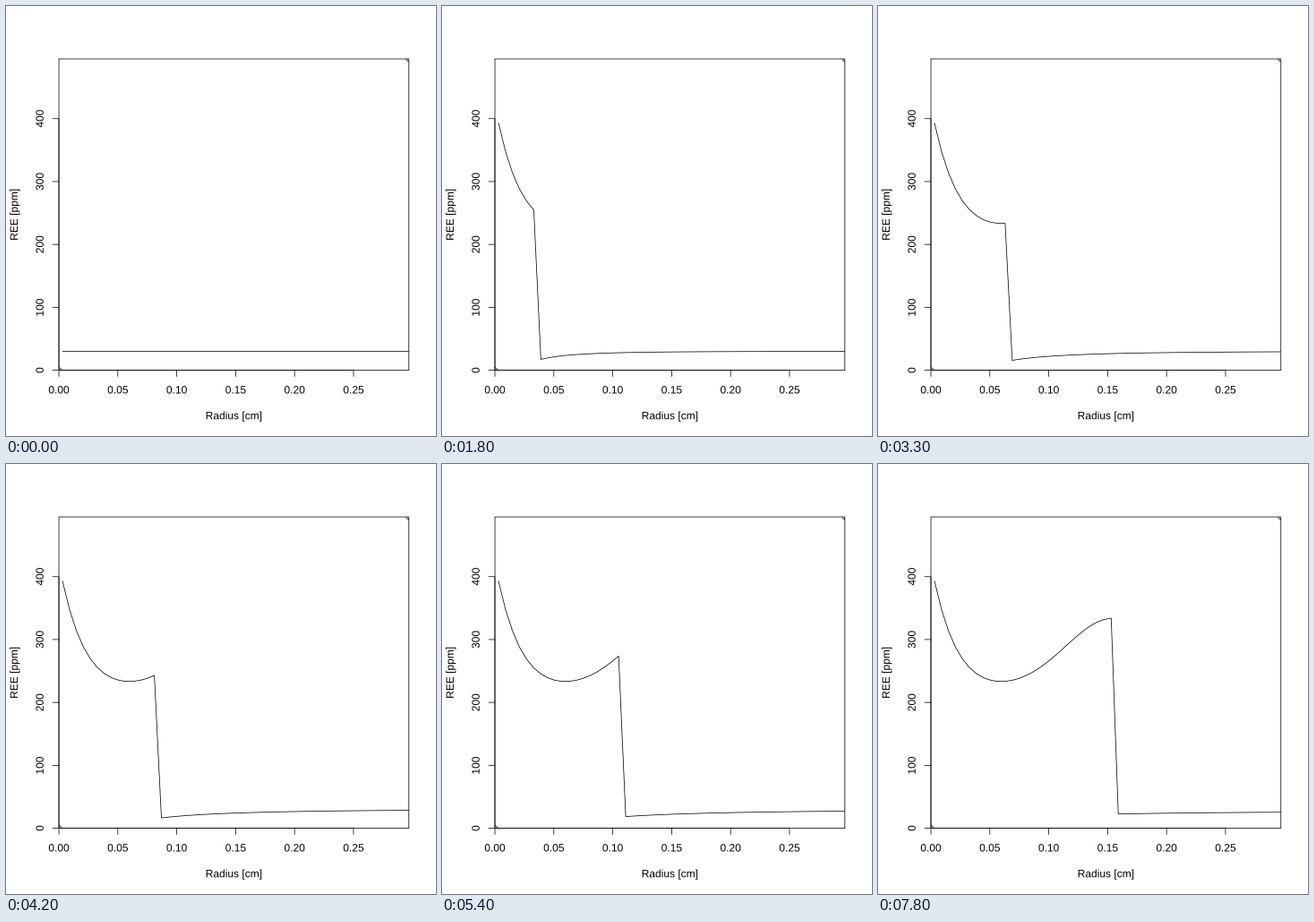
Recreate the animation shown at these times as a matplotlib script. Size 480x480 px, loop 8000 ms.

```python
import matplotlib.pyplot as plt
import numpy as np
from matplotlib.animation import FuncAnimation
from matplotlib.patches import Circle, PathPatch, Rectangle
from matplotlib.textpath import TextPath
from matplotlib.transforms import Affine2D

plt.rcParams["font.family"] = "Liberation Sans"

SIZE = 480
FONT_SIZE = 12
LEFT, RIGHT, TOP, BOTTOM = 59.04, 449.76, 59.04, 406.56
TICK = 7.2
R_MAX, C_MAX = 0.297, 495
BULK = 30           # initial concentration of the surroundings
PARTITION = 14.8    # crystal / surroundings ratio at the rim
LINE = dict(color="black", lw=0.75, snap=False)

SHELLS = np.arange(50)
RADII = 0.003 + 0.006 * SHELLS

# smooth zoning of the crystal through a few key shells
ZONING = np.polynomial.Polynomial.fit(
    [0, 1, 4, 8, 13, 18, 22, 25],
    [393.5, 348, 268.5, 235.2, 242.9, 283.7, 321.3, 334], 7)


def px(r):
    return LEFT + (RIGHT - LEFT) * r / R_MAX


def py(c):
    return BOTTOM - (BOTTOM - TOP) * c / C_MAX


def profile(grown):
    """Concentration along the radius once `grown` shells have formed."""
    conc = np.full(RADII.size, float(BULK))
    if grown:
        conc[:grown] = ZONING(SHELLS[:grown])
        rim, outer = RADII[grown], RADII[grown:]
        decay = 25.4 * np.exp(-grown / 16) - 6
        depletion = BULK - conc[grown - 1] / PARTITION
        conc[grown:] -= depletion * rim / outer * np.exp(-decay * (outer - rim))
    return conc


fig = plt.figure(figsize=(SIZE / 72, SIZE / 72), dpi=72, facecolor="white")
ax = fig.add_axes([0, 0, 1, 1])
ax.set(xlim=(0, SIZE), ylim=(SIZE, 0))
ax.axis("off")


def stroke(xs, ys):
    return ax.plot(xs, ys, solid_capstyle="butt", solid_joinstyle="round",
                   **LINE)[0]


def label(x, y, text, rotation=0):
    """Outlined text, centred on x, y along its baseline."""
    path = TextPath((0, 0), text, size=FONT_SIZE)
    box = path.get_extents()
    place = (Affine2D().translate(-(box.x0 + box.x1) / 2, 0)
             .scale(1, -1).rotate_deg(-rotation).translate(x, y))
    ax.add_patch(PathPatch(place.transform_path(path), fc="black", lw=0,
                           snap=False))


ax.add_patch(Rectangle((LEFT, TOP), RIGHT - LEFT, BOTTOM - TOP,
                       fill=False, **LINE))

# axes
stroke([LEFT, px(0.25)], [BOTTOM, BOTTOM])
for r in np.arange(6) * 0.05:
    stroke([px(r), px(r)], [BOTTOM, BOTTOM + TICK])
    label(px(r), 432.48, f"{r:.2f}")

stroke([LEFT, LEFT], [BOTTOM, py(400)])
for c in range(0, 500, 100):
    stroke([LEFT - TICK, LEFT], [py(c), py(c)])
    label(41.76, py(c), str(c), 90)

label((LEFT + RIGHT) / 2, 461.28, "Radius [cm]")
label(12.96, (TOP + BOTTOM) / 2, "REE [ppm]", 90)

# corner markers, cut off by the plot region
region = Rectangle((LEFT, TOP), RIGHT - LEFT, BOTTOM - TOP,
                   transform=ax.transData)
for corner in ((LEFT, BOTTOM), (RIGHT, TOP)):
    marker = ax.add_patch(Circle(corner, 2.7, fill=False, **LINE))
    marker.set_clip_path(region)

curve = stroke([], [])


def update(i):
    curve.set_data(px(RADII), py(profile(i // 3)))
    return curve,


anim = FuncAnimation(fig, update, frames=80, interval=100, repeat=True,
                     repeat_delay=0)
plt.show()
```
